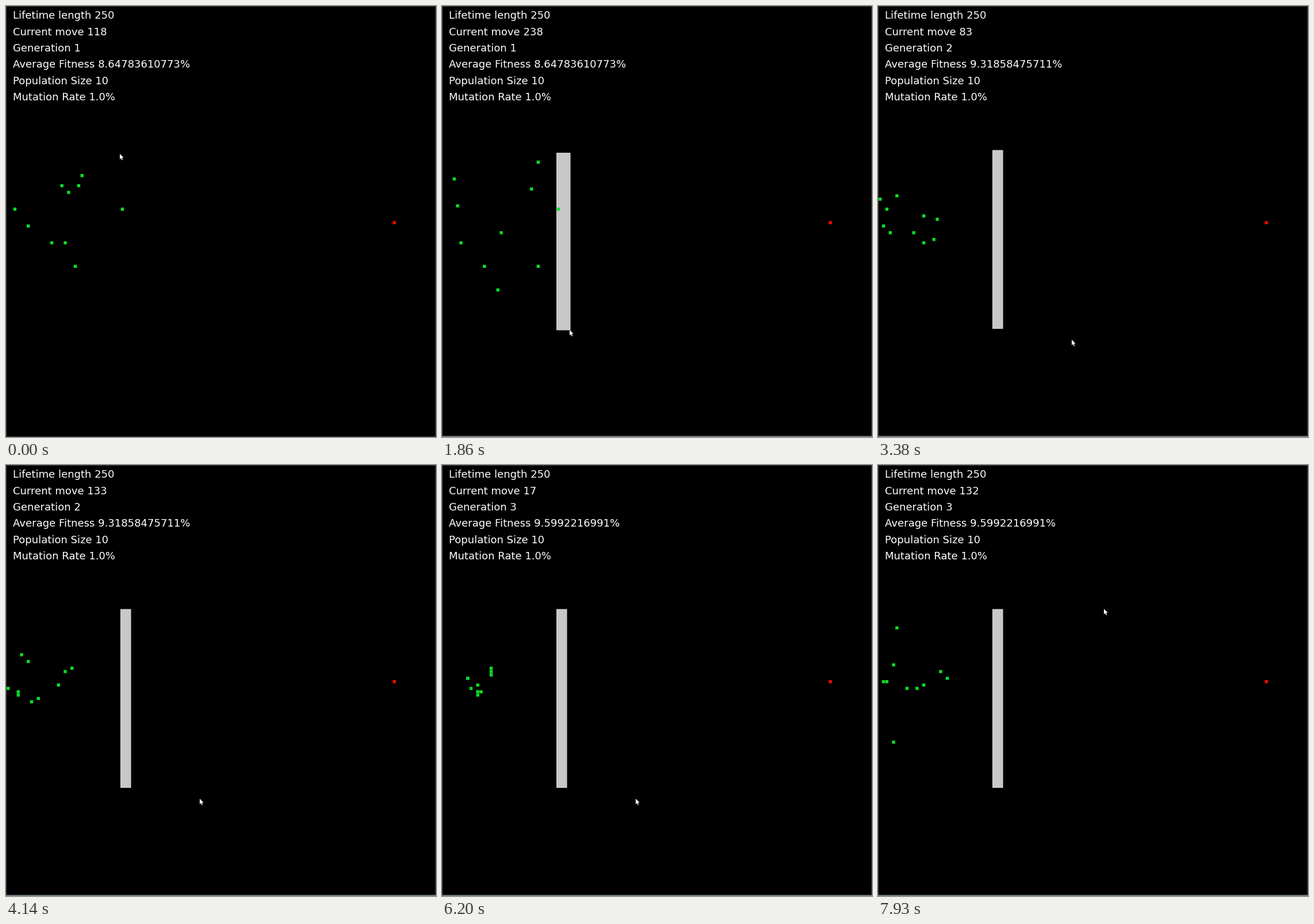
A matplotlib script for the animation above (8000 ms loop, 748 by 749 pixels).

```python
import numpy as np
import matplotlib.pyplot as plt
from matplotlib.animation import FuncAnimation
from matplotlib.patches import Polygon, Rectangle

W, H, DPI = 748, 749, 64
PX = 72 / DPI              # points per pixel
STEP, FRAMES = 50, 160
CELL, X0, Y0, DOT = 5.842, 3.75, 376.5, 5.4
LIFETIME, SIZE = 250, 10
START_COL, GOAL_COL, WALL_COL = 10, 115, 34
FITNESS = ["8.64783610773", "9.31858475711", "9.5992216991"]
DRAG_START, DRAG_END = 150, 1960
rng = np.random.default_rng(7)


def life():
    """Cells of all dots for every move of one generation."""
    pos = np.tile((START_COL, 0), (SIZE, 1))
    path = [pos]
    for _ in range(LIFETIME - 1):
        step = rng.integers(-1, 2, (SIZE, 2))
        step[pos[:, 0] >= WALL_COL] = 0     # dots stick to the wall
        pos = pos + step
        pos[:, 0] = np.maximum(pos[:, 0], 0)
        path.append(pos)
    return path


LIVES = [life() for _ in FITNESS]


def moves_made(i):
    return int(np.ceil(np.interp(i, [0, 37, 67, 99, 124, 158],
                                 [118, 238, 333, 438, 517, 632])))


def ease(t, start, end):
    k = np.clip((t - start) / (end - start), 0, 1)
    return k * k * (3 - 2 * k)


def pointer_at(t):
    """Draw the wall, narrow it, let go, and later move up again."""
    pos = np.array([198.0, 257.0])
    for start, end, shift in [(150, 900, (37, 256)), (1050, 1800, (-13, 50)),
                              (2050, 2450, (115, 17)), (7580, 7900, (56, -330))]:
        pos += ease(t, start, end) * np.array(shift)
    return pos


fig = plt.figure(figsize=(W / DPI, H / DPI), dpi=DPI, facecolor="black")
ax = fig.add_axes([0, 0, 1, 1])
ax.set_xlim(0, W)
ax.set_ylim(H, 0)
ax.axis("off")


def box(x, y, w, h, color, **kw):
    style = {"lw": 0, "snap": False, **kw}
    return ax.add_patch(Rectangle((x, y), w, h, fc=color, **style))


def square(color):
    return box(0, 0, DOT, DOT, color, zorder=4)


def place(sq, col, row):
    sq.set_xy((X0 + CELL * col - DOT / 2, Y0 + CELL * row - DOT / 2))


for edge in [(0, 0, W, 1), (0, 0, 1, H), (W - 1, 0, 1, H), (0, H - 1, W, 1)]:
    box(*edge, "#4a4a4a")
bottom = box(0, H - 2, W, 2, "#6c777b")
wall = box(0, 0, 0, 0, "#c8c8c8", ec="#d6d2d6", lw=PX, zorder=3)
place(square("#fa0a00"), GOAL_COL, 0)
dots = [square("#0be026") for _ in range(SIZE)]
arrow = np.array([(0, 0), (0, 9.4), (2.2, 7.4), (3.7, 11), (5.2, 10.4),
                  (3.7, 6.9), (6.6, 6.6)])
pointer = ax.add_patch(Polygon(arrow, fc="white", lw=0, zorder=6))
lines = [ax.text(12, 22.5 + 28.3 * i, "", color="white", family="DejaVu Sans",
                 size=18 * PX, va="baseline", zorder=5) for i in range(6)]


def draw_wall(t):
    wall.set_visible(t >= DRAG_START)
    if t < DRAG_END:
        x, y = 199.5, 255.5
        w, h = pointer_at(t) + (1, 0) - (x, y)
    else:                                   # snapped to the grid
        x, y, w, h = 199.5, 250.9, 3 * CELL, 53 * CELL
    wall.set_bounds(x, y, w, h)


def update(i):
    t = i * STEP
    gen, move = divmod(moves_made(i), LIFETIME)
    texts = [f"Lifetime length {LIFETIME}", f"Current move {move}",
             f"Generation {gen + 1}", f"Average Fitness {FITNESS[gen]}%",
             f"Population Size {SIZE}", "Mutation Rate 1.0%"]
    for line, text in zip(lines, texts):
        line.set_text(text)
    for dot, cell in zip(dots, LIVES[gen][move]):
        place(dot, *cell)
    draw_wall(t)
    bottom.set_visible(i > 0)
    pointer.set_xy(arrow + pointer_at(t))
    return [*lines, *dots, wall, bottom, pointer]


anim = FuncAnimation(fig, update, frames=FRAMES, init_func=lambda: update(0),
                     interval=STEP, repeat=True, repeat_delay=0)
plt.show()
```
